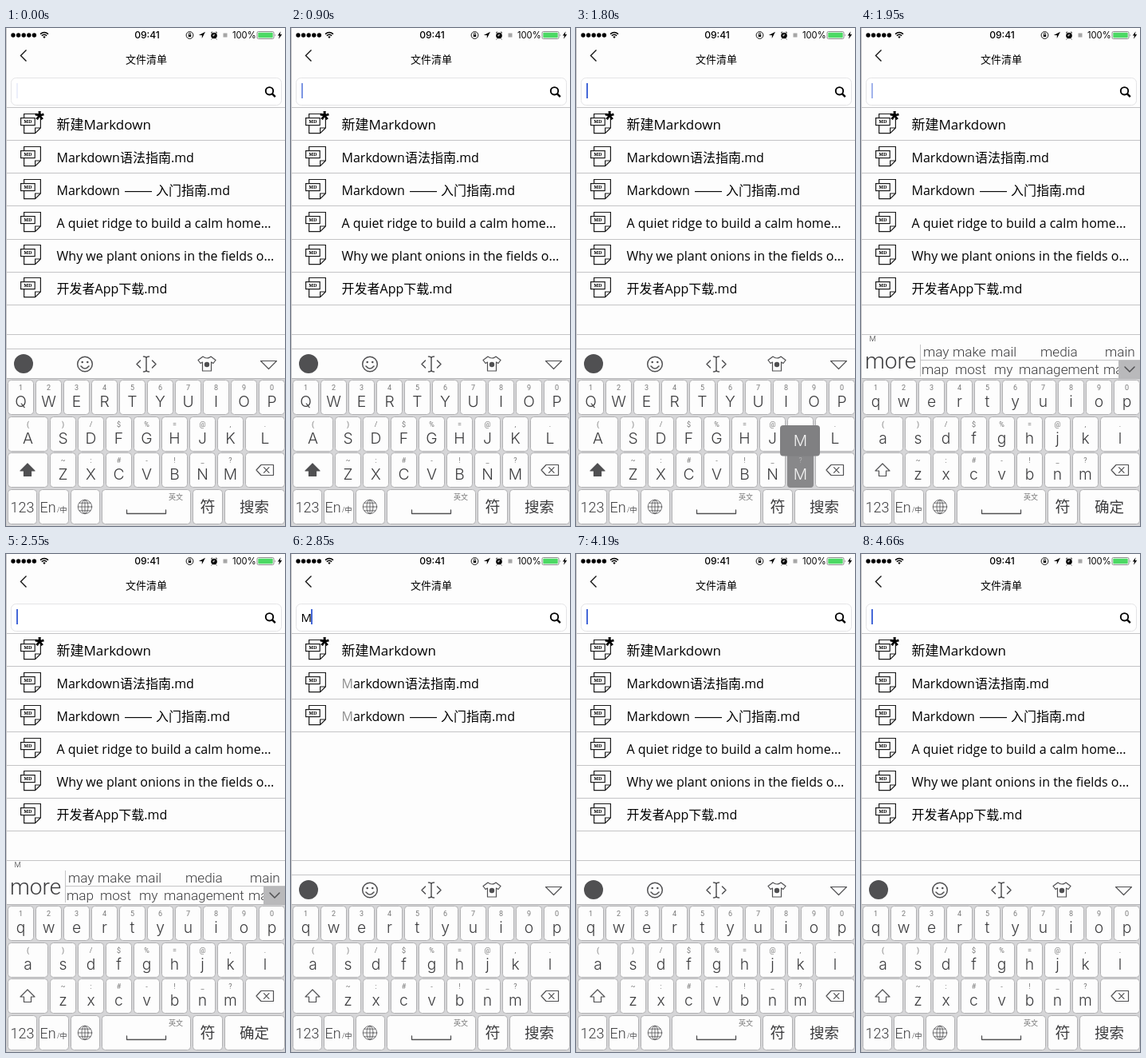
These frames come from a looping animation (350 px wide and 623 px high, 4760 ms). An HTML page:

```html
<!DOCTYPE html>
<html lang="zh">
<head>
<meta charset="utf-8">
<title>文件清单</title>
<style>
  html, body { margin: 0; width: 100%; height: 100%; overflow: hidden; background: #fdfdfd; }
  svg { display: block; width: 350px; height: 623px; }
  text { font-family: "Open Sans", "Noto Sans", "Noto Sans CJK SC", "Noto Sans CJK", sans-serif; fill: #000; white-space: pre; }
  .key, .key text { font-family: Roboto, "Noto Sans CJK SC", "Noto Sans CJK", sans-serif; font-weight: 300; fill: #3c3c3e; }
  .key .letter { font-family: Inter, Roboto, sans-serif; }
  .key .hint { font-size: 9px; font-weight: 400; fill: #777; }
  .key .pale { fill: #f4f4f4; }
  .cap { fill: #fdfdfd; stroke: #b2b2b4; }
  .rule { stroke: #c4c4c6; }
  .icon { fill: none; stroke: #505052; stroke-width: 1.5; stroke-linejoin: round; stroke-linecap: round; }
  .status { font-family: Inter, Roboto, sans-serif; }
  .star, .dash { font-family: "Liberation Sans", sans-serif; }
</style>
</head>
<body>
<svg id="stage" viewBox="0 0 350 623" xmlns="http://www.w3.org/2000/svg"></svg>
<script>
const LOOP = 4760;
const CURSOR = [[0, .1], [150, 0], [450, 1], [900, .7], [1050, 0], [1350, .5], [1500, 1], [1950, .5],
  [2100, 0], [2400, .5], [2550, 1], [3450, .5], [3600, 0], [3890, .5], [4040, 1]];

const text = (x, y, size, body, attrs = "") => `<text x="${x}" y="${y}" font-size="${size}" ${attrs}>${body}</text>`;
const mid = (x, y, size, body, attrs = "") => text(x, y, size, body, `text-anchor="middle" ${attrs}`);
const path = (d, attrs = 'class="icon"') => `<path d="${d}" ${attrs}/>`;
const rect = (x, y, w, h, attrs = "") => `<rect x="${x}" y="${y}" width="${w}" height="${h}" ${attrs}/>`;
const circle = (x, y, r, attrs = "") => `<circle cx="${x}" cy="${y}" r="${r}" ${attrs}/>`;
const rule = y => path(`M0 ${y}H350`, 'class="rule"');

function statusBar() {
  const dots = [0, 1, 2, 3, 4].map(i => circle(9 + i * 6.6, 9, 2.7)).join("");
  const thin = 'fill="none" stroke="#111" stroke-width="1"';
  return dots
    + path("M43 7.6Q48 3.4 53 7.6M44.8 9.6Q48 6.9 51.2 9.6", 'fill="none" stroke="#000" stroke-width="1.5"')
    + path("M46.3 11Q48 9.6 49.7 11L48 13Z", "")
    + mid(177, 13.2, 12.1, "09:41", 'class="status" font-weight="500"')
    + circle(230.5, 9, 4.4, thin) + rect(228.8, 8.4, 3.4, 2.6) + path("M229.4 8.5V7.4a1.1 1.1 0 0 1 2.2 0V8.5", thin)
    + path("M250 4.8L241.8 9H245.8V13Z", "")
    + circle(261, 9.5, 3.8) + path("M257 6.3L259 4.7M265 6.3L263 4.7M258.5 13.5L257.7 14.4M263.5 13.5L264.3 14.4", thin)
    + path("M261 7.3V9.7H259.2", 'fill="none" stroke="#fff" stroke-width=".9"')
    + rect(272.5, 6.5, 5, 5, 'fill="#a6a6a6"')
    + text(284, 13, 11.2, "100%", 'class="status"')
    + rect(315, 4.5, 21, 9, 'rx="1.6" fill="none" stroke="#777" stroke-width=".8"')
    + rect(316.3, 5.8, 18.4, 6.4, 'rx=".6" fill="#4cd964"') + path("M337.5 7.2Q339.1 9 337.5 10.8Z", 'fill="#777"')
    + path("M344.6 4.2L340.8 9.6H343L342 13.8L346.2 8H343.8Z", "");
}

function header() {
  return path("M25.5 27.5L18.5 34.5L25.5 41.5", 'fill="none" stroke="#111" stroke-width="1.4"')
    + mid(176, 44.3, 13, "文件清单")
    + rect(6.5, 62.5, 339, 34, 'rx="6" fill="#fff" stroke="#e4e4e6"')
    + circle(330.5, 78.8, 4.7, 'fill="none" stroke="#000" stroke-width="1.9"')
    + path("M334 82.3L337.8 86.1", 'stroke="#000" stroke-width="2.4"');
}

function fileIcon(dy) {
  const line = 'fill="none" stroke="#1c1c1c" stroke-width="1.2"';
  return `<g transform="translate(0 ${dy})">`
    + path("M22.6 112V107.5H43.4V125L36.6 131.6H22.6V122M36.6 131.6V125H43.4", line)
    + rect(18.6, 112.6, 17.6, 9, 'fill="#fdfdfd" stroke="#1c1c1c" stroke-width="1.2"')
    + mid(27.4, 119.3, 6, "MD", 'font-weight="700" style="font-family:\'Noto Serif\',serif"') + "</g>";
}

function files() {
  const lead = '<tspan class="lead">M</tspan>arkdown';
  const names = [
    "新建Markdown",
    lead + "语法指南.md",
    lead + '<tspan x="149" class="dash" font-size="17">——</tspan><tspan x="188">入门指南.md</tspan>',
    "A quiet ridge to build a calm home...",
    "Why we plant onions in the fields o...",
    "开发者App下载.md"];
  const row = (name, i) => fileIcon(i * 41) + text(63.5, 127 + i * 41, i ? 16 : 17, name)
    + rule(Math.round(140 + i * 41.2) + .5);
  return rule(99.5) + names.slice(0, 3).map(row).join("")
    + mid(42, 124, 30, "*", 'class="star" font-weight="700"')
    + `<g id="others">${names.slice(3).map((name, i) => row(name, i + 3)).join("")}</g>` + rule(383.5);
}

function toolbar() {
  return `<g id="toolbar">` + rule(401.5)
    + circle(22, 420, 12, 'fill="#505052"')
    + circle(99, 420.5, 9.3, 'class="icon"') + circle(95.7, 418, 1.3, 'fill="#505052"') + circle(102.3, 418, 1.3, 'fill="#505052"')
    + path("M94 423Q99 429 104 423")
    + path("M168.5 416L164 420.5L168.5 425M183.5 416L188 420.5L183.5 425M172.5 411Q176 411 176 413Q176 411 179.5 411M176 413V428M172.5 430Q176 430 176 428Q176 430 179.5 430")
    + path("M247 411Q252 415 257 411L263 415.5L260 419.5L257.5 418V429H246.5V418L244 419.5L241 415.5Z", 'class="icon" style="stroke-width:1.2"')
    + circle(252, 421, 3.2, 'fill="#505052"')
    + path("M319.5 416.5H339.5L329.5 426.5Z", 'class="icon" style="stroke-width:1.2"') + "</g>";
}

function candidates() {
  const words = [
    [411, [["may", 78], ["make", 115], ["mail", 163], ["media", 225], ["main", 306]]],
    [433, [["map", 76], ["most", 118], ["my", 167], ["management", 198], ["many", 304]]]];
  return `<g id="candidates" class="key">` + text(10.5, 392, 9.5, "M", 'font-weight="400"') + text(5, 426, 28, "more")
    + words.map(([y, list]) => list.map(([word, x]) => text(x, y, 17.2, word)).join("")).join("")
    + path("M74.5 396V436M74.5 415.5H350", 'class="rule"')
    + rect(323, 416, 27, 22, 'fill="#b9b9bb"') + path("M331 424L337 430L343 424") + "</g>";
}

function cap(x, y, w, body = "") {
  return `<g class="key">${rect(x + .5, y + .5, w - 1, 43, 'rx="4" class="cap"')}${body}</g>`;
}

function letterKey(x, y, w, letter, hint) {
  const cx = x + w / 2;
  return cap(x, y, w, mid(cx, y + 13, 9, hint, 'class="hint"') + mid(cx, y + 34, 19.3, letter, 'class="letter"'));
}

function keyboard() {
  const row = (letters, hints, x, y, width = () => 33) => [...letters].map((letter, i) =>
    letterKey(x + i * 35 + 33 - Math.max(33, i ? 33 : width(i)), y, width(i), letter, hints[i])).join("");
  const homeWidth = i => i === 0 ? 51 : i === 8 ? 50 : 33;
  return rect(0, 438, 350, 185, 'fill="#d6d6d8"') + path("M0 438.5H350", 'stroke="#b4b4b6"')
    + row("QWERTYUIOP", "1234567890", 2, 440)
    + row("ASDFGHJKL", "()/$%=@,.", 20, 486, homeWidth)
    + row("ZXCVBNM", "~:#-!_?", 55, 531)
    + cap(2, 531, 51, path("M27 545L36 554H31.5V560.5H22.5V554H18Z", 'id="shift" stroke="#505052" stroke-width="1.2" stroke-linejoin="round"'))
    + cap(300, 531, 50, path("M314 553L320 546.5H335.5V559.5H320ZM323.5 549.7L330 556.3M330 549.7L323.5 556.3", 'class="icon" style="stroke-width:1.2"'))
    + cap(2, 577, 37, mid(20.5, 605.5, 18, "123"))
    + cap(41, 577, 38, text(42.5, 605.5, 18, "En") + text(64, 605.5, 9, "/中"))
    + cap(81, 577, 37, `<g class="icon" style="stroke-width:.8">${circle(99, 599, 8.7)}
        <ellipse cx="99" cy="599" rx="4" ry="8.7"/><path d="M99 590.3V607.7M90.3 599H107.7M92 594.2H106M92 603.8H106"/></g>`)
    + cap(120, 577, 112, text(204, 590, 9.3, "英文", 'class="hint"') + path("M151.5 603V607.5H200.5V603", 'class="icon" style="stroke-width:1.3"'))
    + cap(234, 577, 38, mid(253, 606, 19, "符"))
    + cap(274, 577, 76, mid(311.5, 606, 18.5, "搜索", 'id="enter"'));
}

function pressedKey() {
  return `<g id="pressed" class="key">` + rect(265, 531, 33, 44, 'rx="4" fill="#88888a"')
    + rect(256, 497, 50, 38.5, 'rx="4" fill="#808082"')
    + mid(281.5, 523, 19.3, "M", 'class="letter pale"') + mid(281.5, 565, 19.3, "M", 'class="letter pale"')
    + mid(281.5, 544, 9, "?", 'style="fill:#c4c4c6"') + "</g>";
}

const stage = document.getElementById("stage");
stage.innerHTML = rect(0, 0, 350, 623, 'fill="#fdfdfd"') + statusBar() + header()
  + text(12.5, 84.5, 15, "M", 'id="typed"') + rect(13, 69, 2, 19, 'id="cursor" fill="#4568d8"')
  + files() + toolbar() + candidates() + keyboard() + pressedKey()
  + path("M.5 0V623", 'stroke="#c8c8ca"');

const find = id => document.getElementById(id);
const show = (id, on) => find(id).setAttribute("visibility", on ? "visible" : "hidden");
const letters = [...document.querySelectorAll(".letter")];
const leads = [...document.querySelectorAll(".lead")];

function render(t) {
  const within = (from, to) => t >= from && t < to;
  const upper = t < 1950, composing = within(1950, 2850), filtered = within(2850, 4190);
  show("pressed", within(1800, 1950));
  show("candidates", composing);
  show("toolbar", !composing);
  show("others", !filtered);
  show("typed", filtered);
  leads.forEach(el => el.style.fill = filtered ? "#8e8e8e" : "#000");
  letters.forEach(el => el.textContent = upper ? el.textContent.toUpperCase() : el.textContent.toLowerCase());
  find("shift").setAttribute("fill", upper ? "#505052" : "none");
  find("enter").textContent = composing ? "确定" : "搜索";
  find("cursor").setAttribute("x", filtered ? 25 : 13);
  find("cursor").setAttribute("opacity", CURSOR.findLast(([start]) => t >= start)[1]);
}

const began = performance.now();
function tick() {
  render((performance.now() - began) % LOOP);
  requestAnimationFrame(tick);
}
tick();
</script>
</body>
</html>
```
